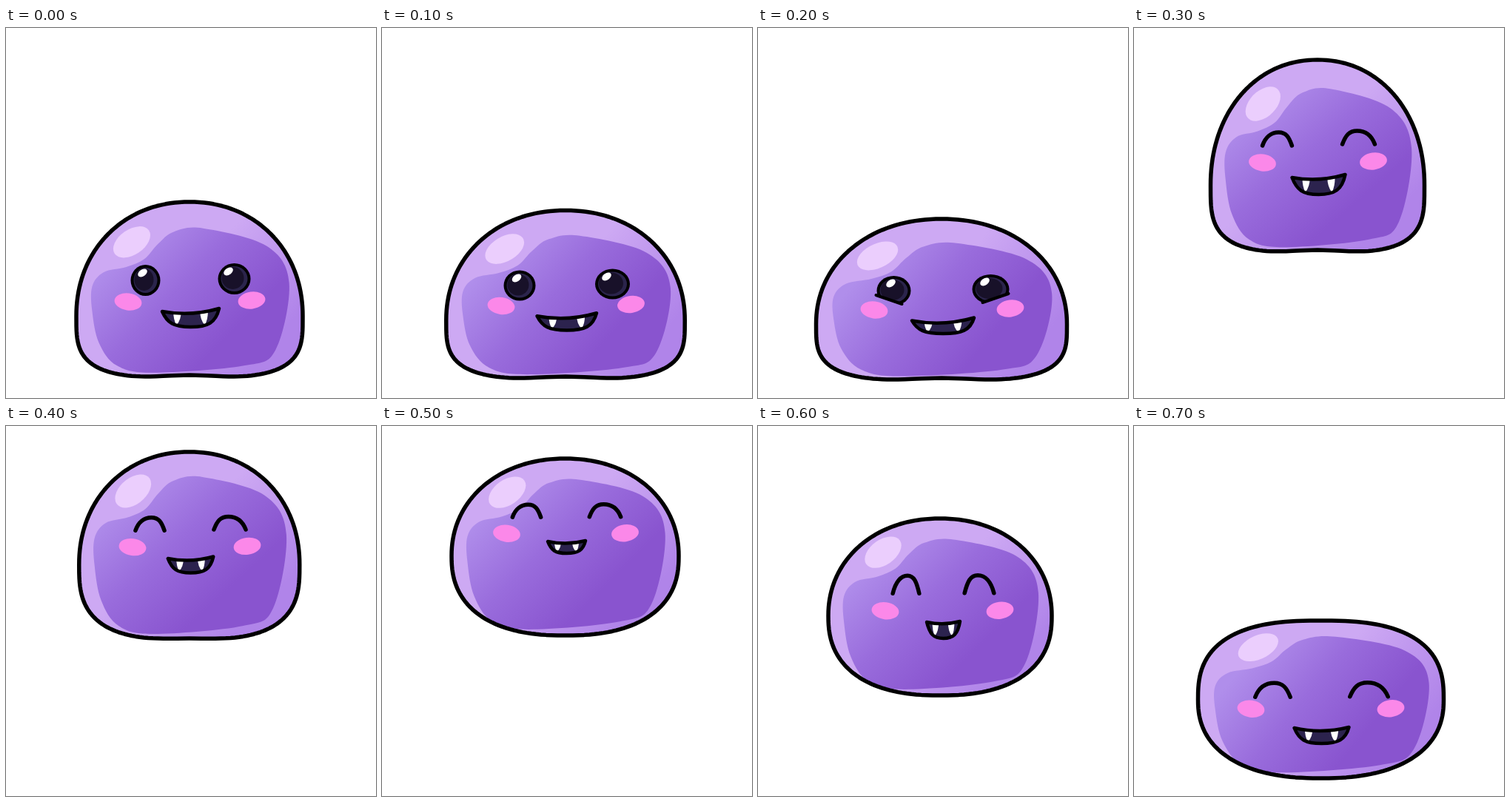
Animation of 500 by 500 pixels, one loop 800 ms. Source, as an HTML page with a canvas:

```html
<!DOCTYPE html>
<html lang="en">
<head>
<meta charset="utf-8">
<title>Jumping slime</title>
<style>
html, body { margin: 0; width: 100%; height: 100%; overflow: hidden; background: #fff; }
canvas { display: block; width: 100vmin; height: 100vmin; }
</style>
</head>
<body>
<canvas id="stage" width="500" height="500"></canvas>
<script>
const c = document.getElementById('stage').getContext('2d');
const STEP = 100, INK = '#000', SIDES = [-1, 1];

// waist: height of the widest line; upper, lower: roundness exponents;
// dent: hollow under the body; bend: lift of the inner colours; tilt: slant of the face
const pear = { waist: .65, upper: 2.1, lower: 3.5, dent: 4, bend: 1, tilt: 2 };
const bun = { waist: .55, upper: 2.1, lower: 2.4, dent: 0, bend: 1.12, tilt: .5 };
const loaf = { waist: .5, upper: 2.65, lower: 2.35, dent: 0, bend: 1.2, tilt: .5 };

// Dark core in fractions of the body box
const core = [[.07, .62], [.07, .48], [.12, .4], [.22, .37], [.3, .325], [.36, .24], [.43, .17],
  [.56, .15], [.84, .25], [.94, .46], [.88, .84], [.74, .93], [.34, .97], [.18, .93], [.1, .8]];

// eye: gap, y (open: centre, shut: top), height; cheek: gap, y; mouth: half width, y, depth
const idle = { form: pear, x: 248, top: 235, w: 306, h: 238, face: 248.5, open: 1, lid: 0,
  eye: [60, 340, 19], cheek: [83.5, 369], mouth: [38.5, 381, 23] };
const squat = { form: pear, x: 248, top: 258, w: 339, h: 219, face: 249, open: 1, lid: 1,
  eye: [65.5, 354, 18], cheek: [92, 380], mouth: [42, 393.5, 19.5] };
const leap = { form: pear, x: 248, top: 43, w: 289, h: 261, face: 248.5, open: 0, lid: 0,
  eye: [55, 140, 18], cheek: [75, 181], mouth: [36, 200, 25] };
const hang = { form: bun, x: 247.5, top: 44, w: 307, h: 239, face: 248.5, open: 0, lid: 0,
  eye: [53, 106, 17], cheek: [80, 145], mouth: [25.5, 155.5, 16.5] };
const fall = { form: bun, x: 246, top: 125, w: 302, h: 239, face: 249.5, open: 0, lid: 0,
  eye: [49.5, 202, 24], cheek: [77.5, 249.5], mouth: [22.5, 264.5, 22.5] };
const land = { form: loaf, x: 252.5, top: 263, w: 332, h: 213, face: 252.5, open: 0, lid: 0,
  eye: [65, 347, 19], cheek: [94.5, 382], mouth: [37, 407.5, 21.5] };

// Halfway between two poses, number by number
function mid(a, b) {
  if (typeof a === 'number') return (a + b) / 2;
  if (Array.isArray(a)) return a.map((v, i) => mid(v, b[i]));
  return Object.fromEntries(Object.keys(a).map(k => [k, mid(a[k], b[k])]));
}
const peak = { ...mid(leap, hang), top: 35, h: 254 };
const poses = [idle, mid(idle, squat), squat, leap, peak, hang, fall, land];

// Two superelliptic halves that meet at the waist
function bodyPath({ form, x, top, w, h }) {
  const path = new Path2D();
  const power = (v, n) => Math.sign(v) * Math.abs(v) ** (2 / n);
  for (let i = 0; i < 160; i++) {
    const a = i / 160 * Math.PI * 2, low = Math.sin(a) > 0;
    const n = low ? form.lower : form.upper;
    const u = power(Math.cos(a), n), v = power(Math.sin(a), n);
    const reach = h * (low ? 1 - form.waist : form.waist);
    const hollow = low ? form.dent * Math.exp(-((u / .35) ** 2)) : 0;
    path.lineTo(x + u * w / 2, top + h * form.waist + v * reach - hollow);
  }
  path.closePath();
  return path;
}

// Closed Catmull-Rom curve
function smooth(pts) {
  const path = new Path2D(), n = pts.length;
  path.moveTo(...pts[0]);
  for (let i = 0; i < n; i++) {
    const [p, q, r, s] = [n - 1, 0, 1, 2].map(k => pts[(i + k) % n]);
    path.bezierCurveTo(q[0] + (r[0] - p[0]) / 6, q[1] + (r[1] - p[1]) / 6,
      r[0] - (s[0] - q[0]) / 6, r[1] - (s[1] - q[1]) / 6, ...r);
  }
  return path;
}

function ellipse(x, y, rx, ry, tilt, colour) {
  c.fillStyle = colour;
  c.beginPath();
  c.ellipse(x, y, rx, ry, tilt, 0, Math.PI * 2);
  c.fill();
}

function drawBody(pose) {
  const { form, x, top, w, h } = pose;
  const at = (u, v) => [x + (u - .5) * w, top + v ** form.bend * h];
  const shade = (from, to, ...colours) => {
    const g = c.createLinearGradient(...at(...from), ...at(...to));
    colours.forEach((col, i) => g.addColorStop(i / (colours.length - 1), col));
    return g;
  };
  const outline = bodyPath(pose);
  c.save();
  c.clip(outline);
  c.fillStyle = shade([.55, .35], [.9, .75], '#cda9f3', '#b084e9');
  c.fill(outline);
  c.fillStyle = shade([.27, .17], [.7, .72], '#b08eeb', '#996cdc', '#8954cf');
  c.fill(smooth(core.map(p => at(...p))));
  c.translate(...at(.245, .228));
  c.scale(w / idle.w, h / idle.h);
  ellipse(0, 0, 28, 17, -.6, '#ebcefd');
  c.restore();
  c.lineWidth = 5.5;
  c.stroke(outline);
}

function openEye(x, y, r, side, lid) {
  const rx = r + lid * 4 + side, drop = (1 - lid) * 20;
  const a = [x + side * 24, y + 6 + drop], b = [x - side * 11, y + 18 + drop];
  c.save();
  c.beginPath();
  c.moveTo(...a);
  c.lineTo(...b);
  c.lineTo(x - side * 40, b[1]);
  c.lineTo(x - side * 40, y - 40);
  c.lineTo(x + side * 40, y - 40);
  c.lineTo(x + side * 40, a[1]);
  c.clip();
  ellipse(x, y, rx + 2, r + 2, 0, INK);
  ellipse(x, y, rx - 2, r - 2, 0, '#2b244c');
  ellipse(x - 2, y - 1, rx - 5, r - 4, 0, '#181129');
  ellipse(x - 6 - side * 2, y - 10, 7, 4.5, -.6, '#fff');
  c.restore();
  if (lid < 1) return;
  c.lineWidth = 4;
  c.beginPath();
  c.moveTo(...a);
  c.lineTo(...b);
  c.stroke();
}

function happyEye(x, y, h, gap, side) {
  const w = gap * .38 + side, m = x - side * 2;
  c.lineWidth = 5.5;
  c.beginPath();
  c.moveTo(x - w, y + h);
  c.bezierCurveTo(x - w * .8, y + h * .35, m - w * .5, y, m, y);
  c.bezierCurveTo(m + w * .5, y, x + w * .8, y + h * .35, x + w, y + h);
  c.stroke();
}

function drawMouth(x, [w, y, depth], tilt) {
  const sag = y + w * .12, low = y + depth, h = low - sag;
  const path = new Path2D();
  path.moveTo(x - w, y + tilt);
  path.quadraticCurveTo(x, 2 * sag - y, x + w, y - tilt);
  path.bezierCurveTo(x + w * .88, low - h * .3, x + w * .6, low, x, low);
  path.bezierCurveTo(x - w * .6, low, x - w * .82, low - h * .3, x - w, y + tilt);
  path.closePath();
  c.fillStyle = '#2c234e';
  c.fill(path);
  c.save();
  c.clip(path);
  c.fillStyle = '#fff';
  for (const s of SIDES) {
    const fx = x + s * w * .47, half = 3 + w * .06;
    c.beginPath();
    c.moveTo(fx - half, sag - 3);
    c.lineTo(fx + half, sag - 3);
    c.quadraticCurveTo(fx + half, sag + h * .5, fx + s, sag + h * .85);
    c.quadraticCurveTo(fx - half, sag + h * .5, fx - half, sag - 3);
    c.fill();
  }
  c.restore();
  c.lineWidth = 4.5;
  c.stroke(path);
}

function draw(pose) {
  const { form, face, eye, cheek, mouth } = pose;
  c.fillStyle = '#fff';
  c.fillRect(0, 0, 500, 500);
  c.strokeStyle = INK;
  c.lineCap = c.lineJoin = 'round';
  drawBody(pose);
  for (const s of SIDES) {
    const [gap, y, h] = eye, ex = face + s * gap, ey = y - s * form.tilt / 2;
    ellipse(face + s * cheek[0], cheek[1] - s * form.tilt / 2, 18.5, 11.5, -s * .13, '#fb88e9');
    if (pose.open) openEye(ex, ey, h, s, pose.lid);
    else happyEye(ex, ey, h, gap, s);
  }
  drawMouth(face + 1, mouth, form.tilt);
}

function tick() {
  draw(poses[Math.floor(performance.now() / STEP) % poses.length]);
  requestAnimationFrame(tick);
}
tick();
</script>
</body>
</html>
```
